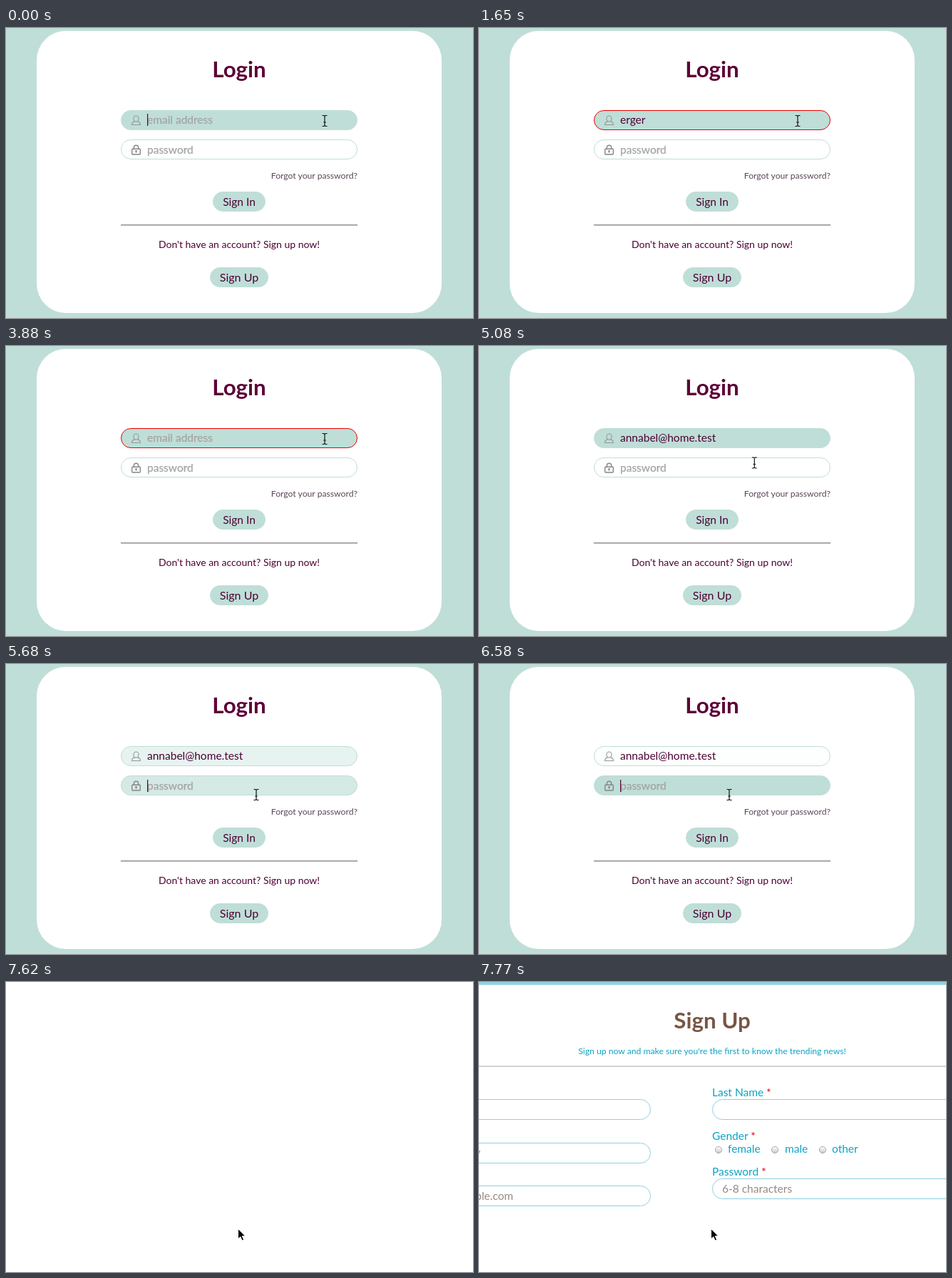
Recreate the animation shown at these times as an HTML page. Size 655 by 406 pixels, loop 8000 ms.

```html
<!DOCTYPE html>
<html lang="en">
<head>
<meta charset="utf-8">
<title>Login form</title>
<style>
  html, body { margin: 0; width: 100%; height: 100%; overflow: hidden; background: #fff; }
  svg { display: block; width: 655px; height: 406px; }
  text { font: 15.5px Lato, "Open Sans", sans-serif; fill: #4d0033; }
  .title { font-size: 31.3px; font-weight: 700; fill: #5c0036; text-anchor: middle; }
  .mid { text-anchor: middle; }
  .end { text-anchor: end; }
  .small { font-size: 12.2px; }
  .hint { fill: #a3a5a4; stroke: #a3a5a4; stroke-width: .25; }
  .pill { fill: #bfded7; stroke: #bfded7; }
  .icon { fill: none; stroke: #929996; stroke-width: 1.1; }
  .lock { stroke: #858585; stroke-width: 1.4; }
  #signup text { fill: #0ca4c4; }
  #signup .title { fill: #785544; }
  #signup .star { fill: #e00016; }
  #signup .sample { fill: #98897f; }
  .box { fill: #fff; stroke: #8fd0e2; }
  .radio { fill: url(#knob); stroke: #989898; stroke-width: .8; }
  .outlined { fill: #fff; stroke: #000; stroke-width: 1; stroke-linejoin: round; }
</style>
</head>
<body>
<svg viewBox="0 0 655 406">
  <defs>
    <linearGradient id="knob" x2="0" y2="1">
      <stop stop-color="#fff"/><stop offset="1" stop-color="#c9c9c9"/>
    </linearGradient>
  </defs>

  <g id="login">
    <rect width="655" height="406" fill="#bfded7"/>
    <rect x="43" y="4" width="568" height="395" rx="41" fill="#fff"/>
    <text class="title" x="327" y="69">Login</text>

    <rect id="emailField" class="pill" x="161.5" y="115.5" width="331" height="27" rx="13.5"/>
    <rect id="passField" class="pill" x="161.5" y="156.5" width="331" height="27" rx="13.5"/>
    <g class="icon">
      <ellipse cx="182.5" cy="127" rx="3.6" ry="4"/>
      <path d="M180.7 130.6c-3 .8-4.2 1.8-4.2 4.9h12c0-3.1-1.2-4.1-4.2-4.9"/>
    </g>
    <g class="icon lock">
      <rect x="176.7" y="169.3" width="11.6" height="7.7" rx="1"/>
      <path d="M179.3 169v-1.6a3.2 3.2 0 0 1 6.4 0v1.6M182.5 172v2.8"/>
      <circle cx="182.5" cy="172.3" r=".6"/>
    </g>
    <text id="email" x="198" y="134"></text>
    <text class="hint" x="198" y="176">password</text>
    <rect id="caret" width="1.2" height="17" fill="#5c0036"/>

    <text class="small end" x="493" y="211" style="fill:#5b4457">Forgot your password?</text>
    <rect class="pill" x="290.5" y="229.5" width="73" height="27" rx="13.5"/>
    <text class="mid" x="327" y="249">Sign In</text>
    <path d="M161 275.5h332" stroke="#969198"/>
    <path d="M161 276.5h332" stroke="#c4c0c6"/>
    <text class="mid" x="327" y="308" style="font-size:14px">Don't have an account? Sign up now!</text>
    <rect id="signUpButton" class="pill" x="286.5" y="335.5" width="81" height="27" rx="13.5"/>
    <text class="mid" x="327" y="355" style="font-size:16px">Sign Up</text>
  </g>

  <g id="signup">
    <rect width="655" height="406" fill="#fff"/>
    <g id="signupContent">
      <rect width="655" height="4" fill="#93d0e0"/>
      <text class="title" x="327" y="65">Sign Up</text>
      <text class="small mid" x="327" y="101">Sign up now and make sure you're the first to know the trending news!</text>
      <path d="M0 118h655" stroke="#c3c5c5" stroke-width="1.6"/>

      <rect class="box" x="-90" y="164.5" width="330.5" height="28" rx="14"/>
      <rect class="box" x="-90" y="225.5" width="330.5" height="28" rx="14"/>
      <rect class="box" x="-90" y="285.5" width="330.5" height="28" rx="14"/>
      <text class="sample end" x="2" y="244">mm/dd/yyyy</text>
      <text class="sample end" x="48" y="305">name@example.com</text>

      <rect class="box" x="327.5" y="164.5" width="420" height="28" rx="14"/>
      <rect class="box" x="327.5" y="275.5" width="420" height="28" rx="14"/>
      <text x="327" y="160">Last Name <tspan class="star">*</tspan></text>
      <text x="327" y="221">Gender <tspan class="star">*</tspan></text>
      <circle class="radio" cx="336" cy="235" r="4.6"/>
      <text x="349" y="239">female</text>
      <circle class="radio" cx="415" cy="235" r="4.6"/>
      <text x="429" y="239">male</text>
      <circle class="radio" cx="482" cy="235" r="4.6"/>
      <text x="495" y="239">other</text>
      <text x="327" y="271">Password <tspan class="star">*</tspan></text>
      <text class="sample" x="341" y="295">6-8 characters</text>
    </g>
  </g>

  <g id="pointer">
    <g id="beam" fill="none" stroke="#111" stroke-width="1.2">
      <path d="M-3.5-7.5h2.3L0-6.5l1.2-1h2.3M-3.5 7.5h2.3L0 6.5l1.2 1h2.3M0-6.5v13M-1.8 2h3.6"/>
    </g>
    <path id="hand" class="outlined" d="M-1.5 1.2Q0-1 1.5 1.2V6l1.2-.8 1.8.5.5 1 1.6-.6 1 1.2 1.6.3.4 2V12L8 14.5V17H.5V15.5L-3.5 10.5-5 8.2q.2-1.8 2-.9L-.3 9.5ZM2.6 10.5V14M4.6 10.5V14M6.6 10.5V14"/>
    <path id="arrow" d="M0 0V14.3L3.3 11.2 5.6 16.5 8.1 15.4 5.8 10.3H10.2Z" fill="#000" stroke="#fff"/>
  </g>
</svg>

<script>
const DURATION = 8000, STEP = 150;
const $ = id => document.getElementById(id);
const show = (id, on) => $(id).style.display = on ? "" : "none";

const HINT = "email address";
const typing = [
  [0, HINT], [750, "e"], [900, "er"], [1050, "erg"], [1200, "erger"],
  [2540, "erge"], [3140, "er"], [3280, HINT], [4330, "annabel@home.test"]
];
const emailCaret = [[0, 150], [750, 1650], [2250, 3880], [4330, 4930]];
const passCaret = [[5530, 6130], [6580, 7170]];

const inside = (t, spans) => spans.some(([from, to]) => t >= from && t < to);
const ramp = (t, from, to) => Math.min(1, Math.max(0, (t - from) / (to - from)));
const smooth = p => p * p * (3 - 2 * p);

function stepped(t) {
  const start = t < 6720 ? 4780 : 6720;
  return t < start ? t : start + Math.floor((t - start) / STEP) * STEP;
}

function pointerAt(t) {
  const toPass = smooth(ramp(t, 4650, 5380)), toButton = smooth(ramp(t, 6580, 7320));
  return [447 - 96 * toPass - 24 * toButton, 130 + 53 * toPass + 164 * toButton];
}

function pointerKind(y) {
  if ((y > 115 && y < 143) || (y > 156 && y < 184)) return "beam";
  if ((y > 229 && y < 257) || (y > 335 && y < 363)) return "hand";
  return "arrow";
}

function drawLogin(t, s) {
  const text = typing.findLast(([at]) => t >= at)[1];
  const email = $("email");
  if (email.textContent !== text) email.textContent = text;
  email.setAttribute("class", text === HINT ? "hint" : "");

  const moved = 1 - (1 - ramp(s, 5530, 5900)) ** 2;
  const focusMove = s >= 5830 ? 1 : moved;
  $("emailField").style.fillOpacity = 1 - focusMove * .97;
  $("emailField").style.stroke = t >= 750 && t < 4330 ? "#f00000" : "";
  $("passField").style.fillOpacity = focusMove * (1 - ramp(s, 7400, 7680));
  $("signUpButton").style.fillOpacity = 1 - ramp(s, 7300, 7620);

  const onPass = inside(t, passCaret);
  show("caret", onPass || inside(t, emailCaret));
  const typed = text === HINT ? 0 : email.getComputedTextLength();
  $("caret").setAttribute("x", onPass ? 198 : 198 + typed);
  $("caret").setAttribute("y", onPass ? 162 : 120);
}

function draw(t) {
  const s = stepped(t), onSignup = t >= 7620;
  show("login", !onSignup);
  show("signup", onSignup);
  show("signupContent", t >= 7770);
  if (!onSignup) drawLogin(t, s);

  const [x, y] = onSignup ? [325.5, 345.5] : pointerAt(s);
  const kind = onSignup ? "arrow" : pointerKind(y);
  for (const id of ["beam", "hand", "arrow"]) show(id, id === kind);
  $("pointer").setAttribute("transform", `translate(${x} ${y})`);
}

const began = performance.now();
function tick() {
  draw((performance.now() - began) % DURATION);
  requestAnimationFrame(tick);
}
tick();
</script>
</body>
</html>
```
